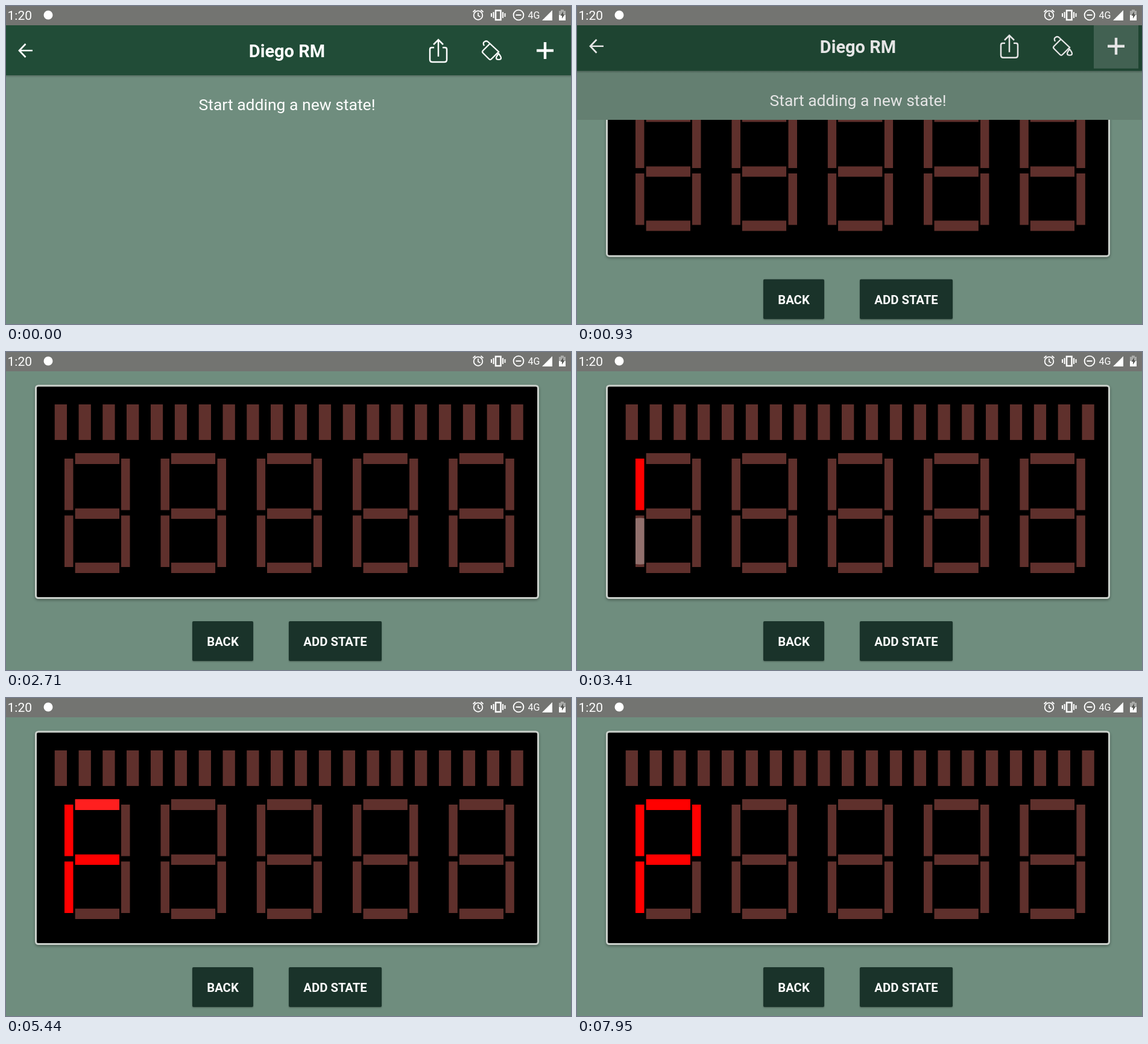
Write an HTML page that moves like this. It is 937 by 528 pixels and loops after 8000 ms.

```html
<!DOCTYPE html>
<html lang="en">
<head>
<meta charset="utf-8">
<title>Segment display editor</title>
<style>
  html, body { margin: 0; height: 100%; overflow: hidden; background: #6f8d7e; }
  #stage { display: block; width: 937px; height: 528px; font-family: Roboto, sans-serif; fill: #fff; }
  .line { fill: none; stroke: #fff; stroke-width: 2.5; }
  .bold { font-weight: 700; text-anchor: middle; }
  .title { font-size: 29px; }
  .label { font-size: 20.3px; }
  .page { fill: #6f8d7e; }
  .button { fill: #1a332a; filter: drop-shadow(0 1px 1px #0005); }
  .panel { fill: #000; stroke: #cbd1cc; stroke-width: 3; filter: drop-shadow(0 2px 2px #0005); }
</style>
</head>
<body>
<svg id="stage" viewBox="0 0 937 528">
  <defs>
    <clipPath id="reveal"><rect id="revealBox" width="937" height="528"/></clipPath>
    <linearGradient id="shade" x2="0" y2="1">
      <stop stop-color="#000" stop-opacity=".22"/><stop offset="1" stop-color="#000" stop-opacity="0"/>
    </linearGradient>
  </defs>

  <rect class="page" width="937" height="528"/>
  <g id="listPage">
    <rect class="page" y="20" width="937" height="530"/>
    <rect y="115" width="937" height="4" fill="url(#shade)"/>
    <rect y="20" width="937" height="95" fill="#214c37"/>
    <svg id="addButton" x="857" y="37" width="74" height="74"></svg>
    <g class="line">
      <path d="M44 74H22M32.5 63L22 74l10.5 11" stroke-width="2.7"/>
      <path d="M710 69h-4q-3 0-3 3v17q0 4 4 4h20q4 0 4-4V72q0-3-3-3h-4M717 84V56M709 64l8-8 8 8"/>
      <path d="M793 66q-3-5 1-7 3-2 6 1l17 16-12 12q-2 2-4 0l-10-10q-2-2 0-4l11-11" stroke-width="2.3"/>
      <path d="M817 79q-8 10 0 10t0-10z" stroke-width="2.2"/>
      <path d="M880 74h28M894 60v28" stroke-width="4.4"/>
    </g>
    <text class="bold title" x="466" y="85">Diego RM</text>
    <text x="466" y="173" font-size="26.5" text-anchor="middle">Start adding a new state!</text>
  </g>
  <rect id="scrim" width="937" height="528" fill="#000"/>

  <g clip-path="url(#reveal)">
    <g id="editPage">
      <rect class="page" width="937" height="528"/>
      <rect class="panel" x="49.5" y="56" width="833" height="352.5" rx="4"/>
      <g id="segments"></g>
      <rect class="button" x="309" y="447" width="101" height="66" rx="2"/>
      <rect class="button" x="469" y="447" width="154" height="66" rx="2"/>
      <text class="bold label" x="359.5" y="488">BACK</text>
      <text class="bold label" x="546" y="488">ADD STATE</text>
    </g>
  </g>

  <rect width="937" height="32" fill="#737471"/>
  <text x="2.5" y="22.5" font-size="21">1:20</text>
  <circle cx="70" cy="15" r="7.5"/>
  <g class="line" stroke-width="2">
    <circle cx="783" cy="15.5" r="7.3" stroke-width="1.8"/>
    <path d="M783 11v5l3.5 2M774.5 10l4-3.5M791.5 10l-4-3.5" stroke-width="1.7"/>
    <path d="M812 7.5h8.5v15.5H812z"/>
    <path d="M808.5 10v10M805 12v6M824 10v10M827.5 12v6" stroke-width="2"/>
    <circle cx="850" cy="15" r="8.4" stroke-width="1.9"/>
    <path d="M845.5 15h9" stroke-width="2"/>
  </g>
  <text x="865.5" y="21" font-size="16">4G</text>
  <path d="M889 24L906 7v17z"/>
  <path d="M917 8h3V6h5v2h3v8h-11z" fill="#a9aaa8"/>
  <path d="M917 15h11v9h-11z"/>
  <path d="M924 9l-4.5 7h2.6v5l4.4-7h-2.5z" fill="#555653"/>
</svg>
<script>
const LOOP = 8000;
const OFF = '#5f302c', ON = '#f00';
const OPEN = { start: 721, duration: 480 };

const $ = id => document.getElementById(id);
const clamp = v => Math.max(0, Math.min(1, v));

function make(parent, tag, attrs) {
  const el = document.createElementNS('http://www.w3.org/2000/svg', tag);
  for (const key in attrs) el.setAttribute(key, attrs[key]);
  return parent.appendChild(el);
}

// Material standard curve: cubic-bezier(.4, 0, .2, 1)
function ease(x) {
  x = clamp(x);
  let low = 0, high = 1;
  for (let i = 0; i < 24; i++) {
    const s = (low + high) / 2, u = 1 - s;
    if (1.2 * u * u * s + 0.6 * u * s * s + s ** 3 < x) low = s; else high = s;
  }
  return low * low * (3 - 2 * low);
}

function addSegment(x, y, width, height) {
  const box = make($('segments'), 'svg', { x, y, width, height });
  const fill = make(box, 'rect', { width, height, fill: OFF });
  return { box, fill, width, height };
}

// Touch ripple, clipped to its box; fades after release
function addRipple({ box, width, height }, press, release, strength) {
  const circle = make(box, 'circle', { cx: width / 2, cy: height / 2 });
  const from = 0.3 * Math.max(width, height), to = Math.hypot(width, height) / 2;
  return t => {
    const shown = clamp((t - press) / 75) * (1 - clamp((t - release) / 150));
    circle.setAttribute('r', from + (to - from) * ease((t - press) / 225));
    circle.setAttribute('fill-opacity', strength * shown);
  };
}

for (let i = 0; i < 20; i++) addSegment(80.5 + 39.83 * i, 87, 20.6, 59.3);

const digits = Array.from({ length: 5 }, (_, i) => {
  const x = 97 + 159.3 * i;
  return {
    top: addSegment(x + 17.4, 168, 73.6, 18),
    middle: addSegment(x + 17.4, 259.5, 73.6, 17.5),
    bottom: addSegment(x + 17.4, 349.5, 73.6, 17.5),
    upperLeft: addSegment(x, 177, 14.7, 85.7),
    upperRight: addSegment(x + 94, 177, 14.7, 85.7),
    lowerLeft: addSegment(x, 271.3, 14.7, 85.7),
    lowerRight: addSegment(x + 94, 271.3, 14.7, 85.7)
  };
});

const taps = [
  ['upperLeft', 2710, 2940],
  ['lowerLeft', 3307, 3565],
  ['middle', 4360, 4580],
  ['top', 5130, 5350],
  ['upperRight', 6760, 6980]
].map(([name, press, release]) => {
  const segment = digits[0][name];
  return { segment, release, ripple: addRipple(segment, press, release, 0.31) };
});

const addRippleAt = addRipple({ box: $('addButton'), width: 74, height: 74 }, 80, LOOP, 0.18);

function draw(t) {
  const x = clamp((t - OPEN.start) / OPEN.duration), p = ease(x);
  addRippleAt(t);
  $('listPage').setAttribute('transform', `translate(0 ${-10.6 * p})`);
  $('scrim').setAttribute('opacity', 0.1 * clamp(x * 3.5));
  $('editPage').setAttribute('transform', `translate(0 ${21 * (1 - p)})`);
  $('revealBox').setAttribute('y', x ? 32 + 496 * (1 - p) : 528);
  for (const { segment, release, ripple } of taps) {
    segment.fill.setAttribute('fill', t >= release ? ON : OFF);
    ripple(t);
  }
}

function tick() {
  draw(performance.now() % LOOP);
  requestAnimationFrame(tick);
}
tick();
</script>
</body>
</html>
```
